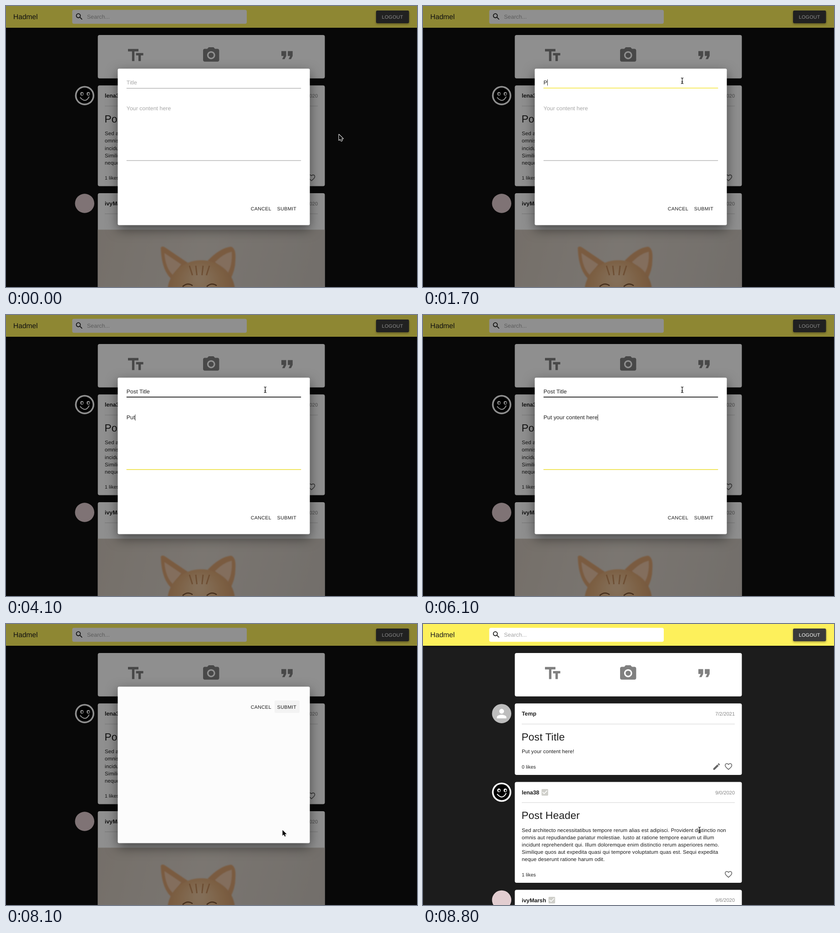
Write an HTML page with a canvas that moves like this. It is 903x620 px and loops after 9.1 s.

```html
<!DOCTYPE html>
<html lang="en">
<head>
<meta charset="utf-8">
<title>Post feed</title>
<style>
  html, body { margin: 0; width: 100%; height: 100%; overflow: hidden; background: #1c1c1c; }
  canvas { display: block; }
</style>
</head>
<body>
<canvas id="stage" width="903" height="620"></canvas>
<script>
const ctx = document.getElementById('stage').getContext('2d');
const LOOP = 9100, STEP = 100;
const INK = '#1c1c1c', GREY = '#808080', YELLOW = '#fdf05b';

const icons = {
  text: 'M2.5 4v3h5v12h3V7h5V4h-13zm19 5h-9v3h3v7h3v-7h3V9z',
  camera: 'M12 8.8a3.2 3.2 0 1 0 0 6.4a3.2 3.2 0 1 0 0-6.4zM9 2L7.17 4H4c-1.1 0-2 .9-2 2v12c0 1.1.9 2 2 2h16c1.1 0 2-.9 2-2V6c0-1.1-.9-2-2-2h-3.17L15 2H9zm3 15c-2.76 0-5-2.24-5-5s2.24-5 5-5 5 2.24 5 5-2.24 5-5 5z',
  quote: 'M6 17h3l2-4V7H5v6h3zm8 0h3l2-4V7h-6v6h3z',
  search: 'M15.5 14h-.79l-.28-.27C15.41 12.59 16 11.11 16 9.5 16 5.91 13.09 3 9.5 3S3 5.91 3 9.5 5.91 16 9.5 16c1.61 0 3.09-.59 4.23-1.57l.27.28v.79l5 4.99L20.49 19l-4.99-5zm-6 0C7.01 14 5 11.99 5 9.5S7.01 5 9.5 5 14 7.01 14 9.5 11.99 14 9.5 14z',
  heart: 'M16.5 3c-1.74 0-3.41.81-4.5 2.09C10.91 3.81 9.24 3 7.5 3 4.42 3 2 5.42 2 8.5c0 3.78 3.4 6.86 8.55 11.54L12 21.35l1.45-1.32C18.6 15.36 22 12.28 22 8.5 22 5.42 19.58 3 16.5 3zm-4.4 15.55l-.1.1-.1-.1C7.14 14.24 4 11.39 4 8.5 4 6.5 5.5 5 7.5 5c1.54 0 3.04.99 3.57 2.36h1.87C13.46 5.99 14.96 5 16.5 5c2 0 3.5 1.5 3.5 3.5 0 2.89-3.14 5.74-7.9 10.05z',
  edit: 'M3 17.25V21h3.75L17.81 9.94l-3.75-3.75L3 17.25zM20.71 7.04c.39-.39.39-1.02 0-1.41l-2.34-2.34c-.39-.39-1.02-.39-1.41 0l-1.83 1.83 3.75 3.75 1.83-1.83z',
  check: 'M19 3H5c-1.11 0-2 .9-2 2v14c0 1.1.89 2 2 2h14c1.11 0 2-.9 2-2V5c0-1.1-.89-2-2-2zm-9 14l-5-5 1.41-1.41L10 14.17l7.59-7.59L19 8l-9 9z',
  person: 'M12 12c2.21 0 4-1.79 4-4s-1.79-4-4-4-4 1.79-4 4 1.79 4 4 4zm0 2c-2.67 0-8 1.34-8 4v2h16v-2c0-2.66-5.33-4-8-4z',
  arrow: 'M0 0V12.6L3 9.9L5 14.4L7 13.5L5.1 9.2H9.2z'
};
for (const name in icons) icons[name] = new Path2D(icons[name]);

function icon(name, cx, cy, scale, color) {
  ctx.save();
  ctx.translate(cx - 12 * scale, cy - 12 * scale);
  ctx.scale(scale, scale);
  ctx.fillStyle = color;
  ctx.fill(icons[name]);
  ctx.restore();
}

// y is the middle of the capital letters; returns the right edge
function text(str, x, y, size, color, { bold = false, gap = 0, align = 'left' } = {}) {
  ctx.font = `${bold ? 'bold ' : ''}${size}px "Liberation Sans", Arial, sans-serif`;
  ctx.letterSpacing = gap + 'px';
  ctx.textRendering = 'geometricPrecision';
  ctx.textAlign = align;
  ctx.fillStyle = color;
  ctx.fillText(str, x, y + size * 0.36);
  return x + ctx.measureText(str).width;
}

function box(x, y, w, h, r, color) {
  ctx.fillStyle = color;
  ctx.beginPath();
  ctx.roundRect(x, y, w, h, r);
  ctx.fill();
}

function disc(x, y, rx, ry, color) {
  ctx.fillStyle = color;
  ctx.beginPath();
  ctx.ellipse(x, y, rx, ry, 0, 0, Math.PI * 2);
  ctx.fill();
}

function shape(color, pathData) {
  ctx.fillStyle = color;
  ctx.fill(new Path2D(pathData));
}

function withShadow(blur, dy, color, draw) {
  ctx.save();
  ctx.shadowBlur = blur;
  ctx.shadowOffsetY = dy;
  ctx.shadowColor = color;
  draw();
  ctx.restore();
}

const ramp = (t, a, b) => Math.min(1, Math.max(0, (t - a) / (b - a)));
const ease = p => p * p * (3 - 2 * p);
const button = (label, x, y, color) => text(label, x, y, 10.7, color, { gap: 0.3 });

function header() {
  withShadow(6, 2, 'rgba(0,0,0,.45)', () => box(0, 0, 903, 48, 0, YELLOW));
  text('Hadmel', 16, 23, 15.6, INK);
  box(145.5, 8.5, 383.5, 30.7, 4, '#fff');
  icon('search', 161, 23.5, 0.807, '#111');
  text('Search...', 178, 23.5, 12.4, '#a3a3a3', { gap: 0.05 });
  withShadow(4, 2, 'rgba(0,0,0,.35)', () => box(813, 10, 72.5, 28, 3, '#3a3a3a'));
  button('LOGOUT', 825.7, 24, '#fff');
}

function toolbar() {
  box(201.7, 64, 498.8, 95.7, 4, '#fff');
  icon('text', 284.8, 109, 1.77, GREY);
  icon('camera', 450.7, 108.6, 1.77, GREY);
  icon('quote', 617.4, 108.4, 1.77, GREY);
}

function smiley(x, y) {
  disc(x, y, 21.2, 21.2, '#fff');
  disc(x, y, 17.6, 17.6, '#000');
  for (const dx of [-6, 8]) {
    disc(x + dx, y - 4, 3.6, 4, '#fff');
    disc(x + dx + 0.6, y - 3.4, 1.8, 2.2, '#000');
  }
  ctx.strokeStyle = '#fff';
  ctx.lineWidth = 2;
  ctx.beginPath();
  ctx.moveTo(x - 10, y + 4);
  ctx.quadraticCurveTo(x + 2, y + 18, x + 10, y + 2);
  ctx.stroke();
}

function guest(x, y) {
  disc(x, y, 21.2, 21.2, '#bdbdbd');
  icon('person', x, y, 1.31, '#fff');
}

function cardTop(y, h, name, date, checkX) {
  box(201.7, y, 498.8, h, 4, '#fff');
  text(name, 217, y + 22.8, 12.35, INK, { bold: true });
  if (checkX) icon('check', checkX, y + 22.8, 0.807, '#cfcfca');
  text(date, 685, y + 23, 11, '#858585', { align: 'right' });
  box(217, y + 45, 468, 1, 0, '#d2d2d2');
}

function textPost(y, h, name, date, checkX, title, lines, likes) {
  cardTop(y, h, name, date, checkX);
  text(title, 216.5, y + 73.5, 22.8, INK, { gap: 0.12 });
  lines.forEach((line, i) => text(line, 217, y + 106 + i * 16.15, 11.45, INK, { gap: 0.123 }));
  text(likes, 217, y + h - 18.3, 10.7, INK, { gap: 0.1 });
  icon('heart', 671.2, y + h - 18.5, 0.807, '#666');
}

function photo(y) {
  ctx.save();
  ctx.beginPath();
  ctx.rect(201.7, y, 498.8, 300);
  ctx.clip();
  ctx.translate(0, y - 493.5);
  const wall = ctx.createLinearGradient(202, 493, 700, 620);
  wall.addColorStop(0, '#cfc5bb');
  wall.addColorStop(0.45, '#dad2c9');
  wall.addColorStop(1, '#cbc4bd');
  box(201, 493, 500, 400, 0, wall);

  ctx.filter = 'blur(1px)';
  shape('#d9a272', 'M340 534Q342 528 350 533L400 567L368 606Q342 588 340 534z');
  shape('#d9a272', 'M443 562Q470 534 494 531Q506 534 504 560Q504 584 492 604z');
  shape('#e8c3a6', 'M348 545L385 570L367 594Q350 578 348 545z');
  shape('#e8c3a6', 'M459 565Q478 546 496 542Q498 572 486 592z');
  const fur = ctx.createRadialGradient(425, 600, 8, 425, 622, 82);
  fur.addColorStop(0, '#e9c49c');
  fur.addColorStop(0.6, '#ddaa78');
  fur.addColorStop(1, '#d09a6a');
  disc(429, 629, 74, 68, fur);
  ctx.filter = 'none';

  ctx.strokeStyle = '#c48d5c';
  ctx.lineWidth = 3;
  for (const dx of [-22, -8, 8, 22]) {
    ctx.beginPath();
    ctx.moveTo(425 + dx, 573);
    ctx.lineTo(425 + dx * 0.7, 594);
    ctx.stroke();
  }
  ctx.strokeStyle = '#79502f';
  ctx.lineWidth = 2.5;
  for (const x of [399, 452]) {
    ctx.beginPath();
    ctx.moveTo(x - 11, 619);
    ctx.quadraticCurveTo(x, 609, x + 11, 617);
    ctx.stroke();
  }
  ctx.restore();
}

const lorem = [
  'Sed architecto necessitatibus tempore rerum alias est adipisci. Provident distinctio non',
  'omnis aut repudiandae pariatur molestiae. Iusto at ratione tempore earum ut illum',
  'incidunt reprehenderit qui. Illum doloremque enim distinctio rerum asperiores nemo.',
  'Similique quos aut expedita quasi qui tempore voluptatum quas est. Sequi expedita',
  'neque deserunt ratione harum odit.'
];
const TITLE = 'Post Title', BODY = 'Put your content here!';

function feed(posted) {
  let y = 175.2;
  if (posted) {
    guest(172.8, y + 22.5);
    textPost(y, 157.8, 'Temp', '7/2/2021', 0, TITLE, [BODY], '0 likes');
    icon('edit', 645, y + 139.4, 0.807, '#666');
    y += 173.4;
  }
  smiley(172.8, y + 22.5);
  textPost(y, 222.4, 'lena38', '9/0/2020', 267.7, 'Post Header', lorem, '1 likes');
  y += 237.8;
  disc(172.8, y + 22.5, 21.2, 21.2, '#e2cdd0');
  cardTop(y, 400, 'ivyMarsh', '9/6/2020', 283);
  photo(y + 80.5);
}

// [time, letters shown]
const bodyKeys = [[3800, 1], [4100, 3], [4300, 4], [4400, 5], [4600, 6], [4900, 7], [5000, 8],
  [5100, 9], [5200, 10], [5300, 11], [5500, 12], [5600, 13], [5700, 14], [5900, 17],
  [6000, 19], [6100, 21], [6500, 22]];

function typedBody(t) {
  let n = 0;
  for (const [at, count] of bodyKeys) if (t >= at) n = count;
  return BODY.slice(0, n);
}

const typedTitle = t => TITLE.slice(0, Math.max(0, Math.floor((t - 1700) / 150) + 1));

function pointer(t) {
  const go = ease(ramp(t, 0, 1100)), drop = ease(ramp(t, 6900, 7700));
  const x = 731.5 - 162 * go + 38 * drop;
  const y = 283.5 - 118.5 * go + 289.5 * drop;
  const inRow = x > 265 && x < 648;
  const overTitle = inRow && y > 157 && y < 183;
  const overBody = inRow && y > 214 && y < 342;
  const beam = t < 8000 ? overTitle || overBody : t >= 8600;
  return { x, y, beam, overTitle, overBody, overSubmit: y > 433 };
}

function field(value, hint, y, lineY, focus, hover) {
  const end = text(value || hint, 264.8, y, 12.25, value ? INK : '#a6a6a6', { gap: 0.08 });
  if (focus > 0) box(value ? end : 264.5, y - 6.5, 1, 13.5, 0, '#333');
  if (hover && focus < 1) box(264.8, lineY - 0.6, 383.4, 1.6, 0, '#161616');
  else box(264.8, lineY, 383.4, 1, 0, '#959595');
  if (focus > 0) box(456.5 - 191.7 * focus, lineY - 0.6, 383.4 * focus, 1.7, 0, '#f6e954');
}

function dialog(t, mouse) {
  const open = t < 8000;
  withShadow(26, 9, 'rgba(0,0,0,.5)', () =>
    box(245.5, 138.3, 422, 345.2, 3, t < 8100 ? '#fff' : '#fcfcfc'));
  if (open) {
    const titleFocus = t < 3400 ? ramp(t, 1200, 1400) : 0;
    const bodyFocus = t < 7900 ? ramp(t, 3300, 3500) : 0;
    field(typedTitle(t), 'Title', 168.5, 180.9, titleFocus, mouse.overTitle);
    field(typedBody(t), 'Your content here', 226, 340.6, bodyFocus, mouse.overBody);
  }
  const y = open ? 447 : 182.7;
  if (mouse.overSubmit) box(590, y - 14, 55, 27.5, 3, '#f3f3f3');
  button('CANCEL', 537.8, y, INK);
  button('SUBMIT', 595.8, y, INK);
}

function cursor({ x, y, beam }) {
  ctx.save();
  ctx.translate(x, y);
  if (beam) {
    ctx.strokeStyle = '#111';
    ctx.lineWidth = 1.2;
    ctx.stroke(new Path2D('M-2.6 -6.3Q0 -6.3 0 -4.3V4.3Q0 6.3 -2.6 6.3M2.6 -6.3Q0 -6.3 0 -4.3M0 4.3Q0 6.3 2.6 6.3M-1.8 2.2H1.8'));
  } else {
    ctx.strokeStyle = '#fff';
    ctx.lineWidth = 2;
    ctx.lineJoin = 'round';
    ctx.stroke(icons.arrow);
    ctx.fillStyle = '#000';
    ctx.fill(icons.arrow);
  }
  ctx.restore();
}

function render(t) {
  const dim = t < 8300 ? 1 : t < 8400 ? 0.08 : 0;
  const back = 28 - 14 * dim;
  box(0, 0, 903, 620, 0, `rgb(${back},${back},${back})`);
  toolbar();
  feed(t >= 8500);
  header();
  const mouse = pointer(t);
  if (dim) {
    box(0, 0, 903, 620, 0, `rgba(0,0,0,${0.44 * dim})`);
    ctx.globalAlpha = dim < 1 ? 0.06 : 1;
    dialog(t, mouse);
    ctx.globalAlpha = 1;
  }
  cursor(mouse);
}

const start = performance.now();
function tick() {
  const t = (performance.now() - start) % LOOP;
  render(Math.floor(t / STEP) * STEP);
  requestAnimationFrame(tick);
}
tick();
</script>
</body>
</html>
```
